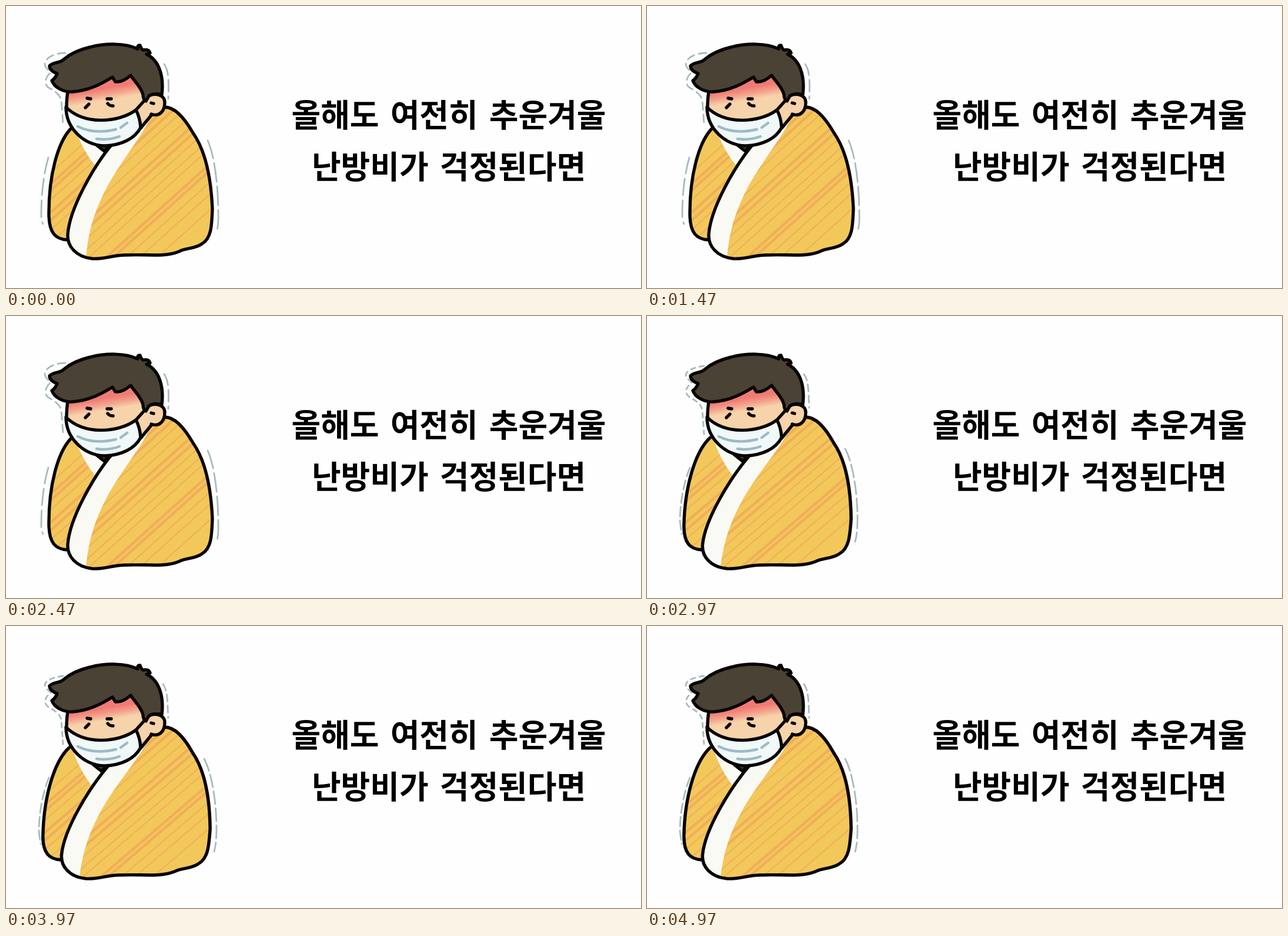
Recreate the animation shown at these times as an HTML page. Size 1080 by 480 pixels, loop 5.01 s.

```html
<!DOCTYPE html>
<html lang="ko">
<head>
<meta charset="utf-8">
<style>
html, body { margin: 0; width: 100%; height: 100%; overflow: hidden; background: #fefefe; }
svg { display: block; width: 1080px; height: 480px; }
text { font: 700 54px "Noto Sans CJK KR", "Noto Sans CJK", sans-serif; word-spacing: 4px; text-anchor: middle; }
.ink { stroke: #080604; stroke-width: 5.4; stroke-linecap: round; stroke-linejoin: round; }
.line { fill: none; }
.hair { fill: #4a4234; }
.skin { fill: #f6d3aa; }
.shiver { fill: none; stroke: #a9babd; stroke-width: 2.8; stroke-linecap: round; }
.pleat { fill: none; stroke: #9dbbc6; stroke-width: 4.5; stroke-linecap: round; }
</style>
</head>
<body>
<svg viewBox="0 0 1080 480">
  <defs>
    <pattern id="cloth" width="600" height="20" patternUnits="userSpaceOnUse" patternTransform="rotate(48)">
      <rect width="600" height="20" fill="#f2c85b"/>
      <g stroke="#f2ad59">
        <path stroke-width="4.5" d="M276 0v20M284 0v20M312 0v20M322 0v20M364 0v20M374 0v20M432 0v20M440 0v20"/>
        <path stroke-width="2" d="M262 0v20M296 0v20M334 0v20M350 0v20M386 0v20M400 0v20M412 0v20M455 0v20M470 0v20M490 0v20"/>
      </g>
    </pattern>
    <linearGradient id="fever" gradientUnits="userSpaceOnUse" x1="160" y1="120" x2="167" y2="161">
      <stop offset=".5" stop-color="#f07b74"/>
      <stop offset=".75" stop-color="#f3a28c"/>
      <stop offset="1" stop-color="#f6d3aa"/>
    </linearGradient>
  </defs>

  <g id="tremorA" class="shiver">
    <path stroke-dasharray="13 8" d="M101 80C84 80 68 87 66 98C66 106 72 108 76 113C66 122 65 132 71 138C80 143 91 149 94 160L97 200"/>
    <path stroke-dasharray="20 8" d="M269 99C277 110 277 128 276 158"/>
    <path stroke-dasharray="28 9" d="M72 258C64 285 60 320 60 355Q60 366 63 371"/>
    <path stroke-dasharray="32 8" d="M343 229C355 255 361 310 361 350Q362 377 357 386"/>
  </g>
  <g id="tremorB" class="shiver" visibility="hidden">
    <path stroke-dasharray="8 7" d="M97 85C82 87 66 92 66 101C67 107 74 110 76 114C65 122 64 131 71 137C80 143 92 148 94 160L97 201"/>
    <path stroke-dasharray="12 7" d="M267 99C276 112 274 130 276 156"/>
    <path stroke-dasharray="16 7" d="M73 258C62 285 56 320 56 350L59 371"/>
    <path stroke-dasharray="22 7" d="M337 226C350 250 358 300 358 345Q358 370 354 384"/>
  </g>

  <g id="blanket">
    <path fill="url(#cloth)" d="M112 207C88 230 72 290 73 358C74 386 84 397 106 398L178 238L160 205Z"/>
    <path fill="#fafaf5" d="M117 208Q129 243 151 271L178 238L160 205Z"/>
    <path class="ink line" d="M112 207C88 230 72 290 73 358C74 386 84 397 104 398"/>
    <path class="ink hair" d="M153 236L167 247L178 236Z"/>
    <path fill="#fafaf5" d="M178 238C148 275 108 345 105 389C104 408 118 427 147 430L240 300L268 172L225 205Z"/>
    <path fill="url(#cloth)" d="M247 187C229 228 185 275 162 328C145 365 139 395 136 429L147 430C167 431 178 425 200 424C245 422 268 428 294 418C306 411 320 414 333 405C349 396 350 375 351 345C349 300 342 250 318 216C302 188 286 171 268 172Z"/>
    <path class="ink line" d="M178 238C148 275 108 345 105 389C104 408 118 427 147 430C167 431 178 425 200 424C245 422 268 428 294 418C306 411 320 414 333 405C349 396 350 375 351 345C349 300 342 250 318 216C302 188 286 171 268 172"/>
  </g>

  <path class="skin" d="M104 140V176L150 215L229 208L247 186L262 160L240 120Z"/>
  <path fill="url(#fever)" d="M104 140V172L150 198L222 176L236 158L215 112L170 115Z"/>
  <path class="ink line" d="M105 146Q103 158 103 173M229 208L247 186"/>
  <path fill="#f0f8f8" class="ink" d="M102 172C102 208 132 237 168 238C196 237 219 226 229 207Q228 190 221 177C190 200 130 202 102 172Z"/>
  <path class="ink line" d="M221 177L238 158"/>
  <path class="pleat" d="M122 205Q150 219 187 210M154 226Q175 229 193 222M195 207L206 199"/>
  <path class="ink line" d="M138 157L144 158M135 173L141 167M172 158L179 158M173 166Q176 170 182 170"/>

  <path class="ink skin" d="M242 154C251 147 270 150 270 164C270 179 261 189 247 184"/>
  <path class="ink line" d="M247 165L251 166"/>
  <path class="ink hair" d="M74 102C80 95 91 98 98 91C111 80 126 74 143 70C170 63 203 63 224 73Q223 66 228 67Q230 73 233 75Q243 73 245 80L239 82C260 92 269 119 265 151Q252 147 243 153L238 162Q233 159 233 151C230 138 219 129 212 118C203 126 194 130 186 129L181 121C165 131 142 144 113 146C97 147 82 138 78 127Q84 123 87 115Q74 110 74 102Z"/>

  <text x="753" y="205.5">올해도 여전히 추운겨울</text>
  <text x="753" y="293.5">난방비가 걱정된다면</text>
</svg>
<script>
const LOOP = 5010, LAST = 149;
const blanket = document.getElementById("blanket");
const tremors = ["tremorA", "tremorB"].map(id => document.getElementById(id));
const poses = ["matrix(1 0 0 1 0 0)", "matrix(1.0214 0 -.032 1 -.3 0)"];

function draw() {
  // Thirty steps a second, with step starts rounded to 10 ms.
  const time = Math.floor(performance.now() % LOOP / 10) * 10;
  const pose = Math.min(LAST, Math.floor((time + 4) * 0.03)) % 2;
  blanket.setAttribute("transform", poses[pose]);
  tremors.forEach((g, i) => g.setAttribute("visibility", i === pose ? "visible" : "hidden"));
  requestAnimationFrame(draw);
}
draw();
</script>
</body>
</html>
```
